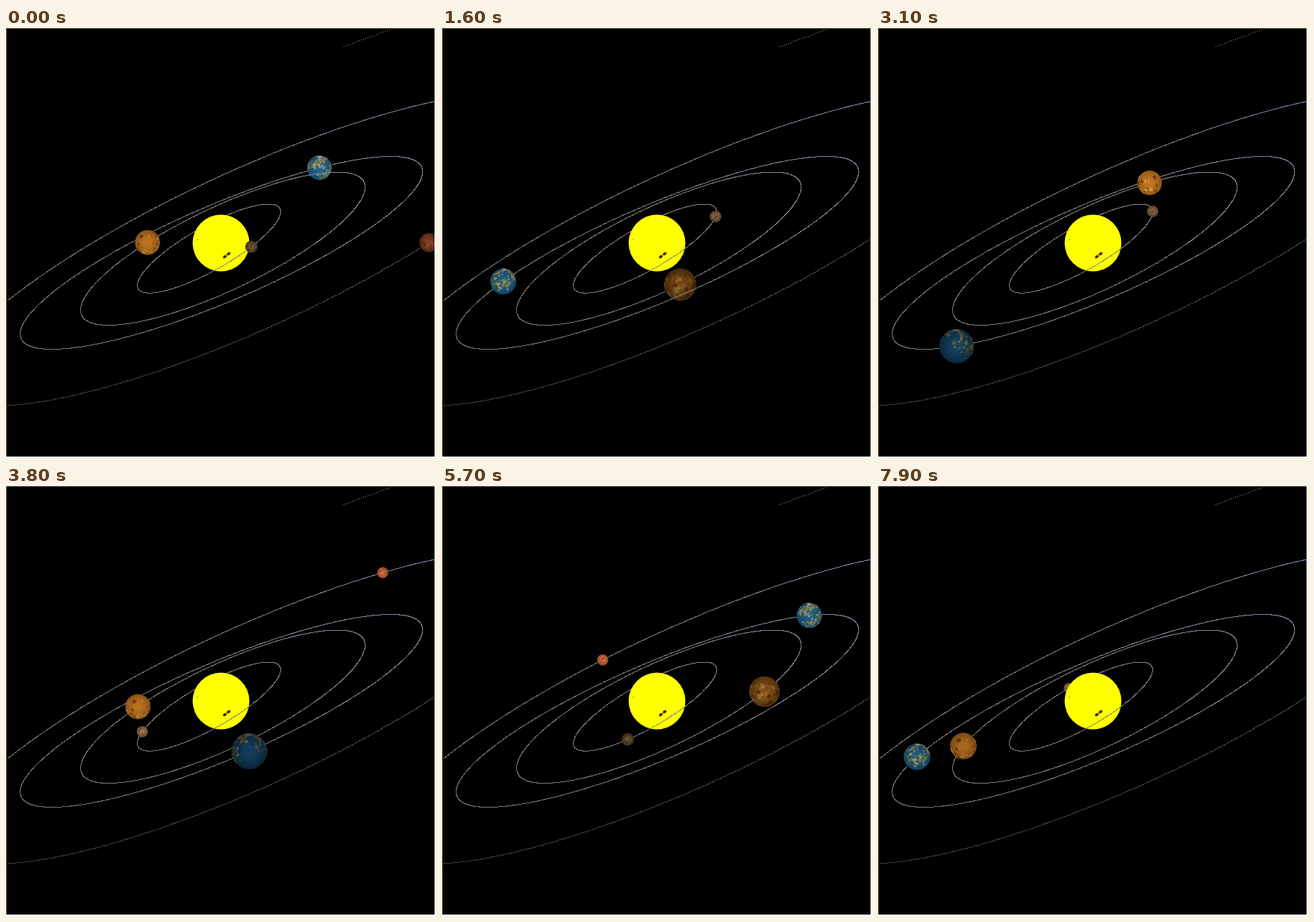
Write an HTML page with a canvas that moves like this. It is 591 by 591 pixels and loops after 8 s.

```html
<!DOCTYPE html>
<html lang="en">
<head>
<meta charset="utf-8">
<title>Inner planets</title>
<style>
  html, body { margin: 0; width: 100%; height: 100%; overflow: hidden; background: #000; }
  canvas { display: block; }
</style>
</head>
<body>
<canvas id="stage" width="591" height="591"></canvas>
<script>
const ctx = document.getElementById('stage').getContext('2d');
const RAD = Math.PI / 180, LOOP = 8000, STEP = 100;
const FRONT = 266; // orbit angle nearest to the viewer

// Orbit on screen: x = cx + w cos(a), y = cy - h cos(a - tilt).
// Angle over time: a = mean + c0 + c1 cos(a) + c2 sin(a) + c3 sin(2a), in degrees.
const planets = [
  { cx: 279, w: 98.5, cy: 303.1, h: 61.1, tilt: 34, period: 1466, c: [309.9, 9.5, 11.5, 0],
    r: 7.8, depth: .08, spin: 36.8, base: '#a87844', spots: ['#6e4a2c', '#c89a60', '#8a7060'] },
  { cx: 298, w: 195.5, cy: 303.25, h: 105.25, tilt: 36.6, period: 3745, c: [125, 8, 1.4, 0],
    r: 19, depth: .14, spin: -8.9, base: '#c47820', spots: ['#e8ac4c', '#84440c', '#a85414', '#d88c30'] },
  { cx: 296, w: 276.5, cy: 309, h: 132.5, tilt: 32.75, period: 6083, c: [53.3, 12, 1.9, 0],
    r: 19.8, depth: .195, spin: 5.9, base: '#1c649a', spots: ['#b8aa84', '#4c7a48', '#8e8a5c'], land: true },
  { cx: 335.3, w: 419.2, cy: 304.2, h: 215.3, tilt: 33.46, period: 11450, c: [295, 20.74, -1.44, 2.53],
    r: 9.8, depth: .3, spin: -54.7, base: '#cc6438', spots: ['#a04824', '#d88060', '#b4502c'], dotted: true }
];

let seed = 11;
function rand() {
  seed = (seed * 16807) % 2147483647;
  return seed / 2147483647;
}

function orbitPoint(p, a) {
  return [p.cx + p.w * Math.cos(a * RAD), p.cy - p.h * Math.cos((a - p.tilt) * RAD)];
}

function orbitAngle(p, t) {
  const [c0, c1, c2, c3] = p.c, mean = 360 * t / p.period + c0;
  let a = mean;
  for (let i = 0; i < 40; i++) {
    const q = a * RAD;
    a = mean + c1 * Math.cos(q) + c2 * Math.sin(q) + c3 * Math.sin(2 * q);
  }
  return a;
}

// Unsmoothed one-pixel arc
function arcPixels(p, from, to) {
  const path = new Path2D(), step = 45 / p.w;
  let lastX, lastY, n = 0;
  for (let a = from; a <= to; a += step) {
    const [x, y] = orbitPoint(p, a).map(Math.floor);
    if (x === lastX && y === lastY) continue;
    lastX = x;
    lastY = y;
    n++;
    if (x < 2 || (p.dotted && from >= 180 && n % 2)) continue;
    path.rect(x, y, 1, 1);
  }
  return path;
}

function makeSpots(p) {
  const spots = [], groups = p.land ? 12 : 110, each = p.land ? 24 : 1;
  for (let g = 0; g < groups; g++) {
    const lat = Math.asin(rand() * 1.8 - (p.land ? .7 : .9)), lon = rand() * 360;
    for (let i = 0; i < each; i++) {
      const spread = p.land ? .9 : 0;
      spots.push({
        lat: lat + (rand() - .5) * spread,
        lon: lon + (rand() - .5) * spread * 70,
        size: p.land ? .04 + rand() * .08 : .04 + rand() * .13,
        color: p.spots[Math.floor(rand() * p.spots.length)]
      });
    }
  }
  if (p.land) spots.push({ lat: 1.5, lon: 0, size: .18, color: '#c8cccc' });
  return spots;
}

for (const p of planets) {
  p.back = arcPixels(p, 0, 180);
  p.front = arcPixels(p, 180, 360);
  p.marks = makeSpots(p);
}

const farArc = new Path2D();
for (let x = 464; x < 528; x += 3) farArc.rect(x, Math.round(25 - (x - 464) * 23 / 63), 1, 1);

const lineColor = ctx.createLinearGradient(0, 520, 590, 100);
lineColor.addColorStop(0, '#747458');
lineColor.addColorStop(.5, '#808080');
lineColor.addColorStop(1, '#8484a8');

function disc(x, y, r, color) {
  ctx.fillStyle = color;
  ctx.beginPath();
  ctx.arc(x, y, r, 0, 2 * Math.PI);
  ctx.fill();
}

function drawLine(path) {
  ctx.fillStyle = lineColor;
  ctx.fill(path);
}

function drawSpot(s, turn) {
  const lon = (s.lon + turn) * RAD, k = Math.cos(s.lat);
  const x = k * Math.sin(lon), y0 = Math.sin(s.lat), z0 = k * Math.cos(lon);
  const y = y0 * .91 - z0 * .41, z = y0 * .41 + z0 * .91;
  if (z < .05) return;
  ctx.save();
  ctx.translate(x, -y);
  ctx.rotate(Math.atan2(-y, x));
  ctx.scale(z, 1);
  disc(0, 0, s.size, s.color);
  ctx.restore();
}

function drawPlanet(p, t) {
  const near = Math.cos((p.a - FRONT) * RAD);
  const [x, y] = orbitPoint(p, p.a), r = p.r / (1 - p.depth * near);
  ctx.save();
  ctx.translate(x, y);
  ctx.scale(r, r);
  disc(0, 0, 1, p.base);
  ctx.beginPath();
  ctx.arc(0, 0, 1, 0, 2 * Math.PI);
  ctx.clip();
  for (const s of p.marks) drawSpot(s, p.spin * t / STEP);
  // The side turned to the viewer darkens as the planet comes to the front
  const dim = .21 + .2 * near, shade = ctx.createRadialGradient(0, 0, .3, 0, 0, 1);
  shade.addColorStop(0, `rgba(0,0,0,${dim})`);
  shade.addColorStop(1, `rgba(0,0,0,${dim + .25})`);
  disc(0, 0, 1.1, shade);
  ctx.restore();
}

function drawSun() {
  disc(295.5, 295.5, 39, '#ff0');
  disc(263, 290.5, 1, '#b8b000');
  for (const [x, y] of [[300.8, 314.3], [306, 310.3]]) {
    ctx.save();
    ctx.translate(x, y);
    ctx.rotate(-.6);
    ctx.scale(1.5, 1);
    disc(0, 0, 2.2, '#a89600');
    disc(0, 0, 1.5, '#2c2000');
    ctx.restore();
  }
}

function drawBorder() {
  ctx.fillStyle = '#6c6c4c';
  ctx.fillRect(0, 0, 591, 1);
  ctx.fillRect(0, 0, 1, 591);
  ctx.fillStyle = '#fff';
  ctx.fillRect(589, 0, 2, 591);
  ctx.fillRect(0, 589, 591, 2);
}

function draw(t) {
  ctx.fillStyle = '#000';
  ctx.fillRect(0, 0, 591, 591);
  drawLine(farArc);

  for (const p of planets) {
    p.a = orbitAngle(p, t);
    p.isNear = Math.sin(p.a * RAD) < .3;
  }
  for (const p of [...planets].reverse()) {
    drawLine(p.back);
    if (!p.isNear) drawPlanet(p, t);
  }
  drawSun();
  for (const p of planets) {
    drawLine(p.front);
    if (p.isNear) drawPlanet(p, t);
  }
  drawBorder();
}

const start = performance.now();
function tick() {
  const t = (performance.now() - start) % LOOP;
  draw(Math.floor(t / STEP) * STEP);
  requestAnimationFrame(tick);
}
tick();
</script>
</body>
</html>
```
